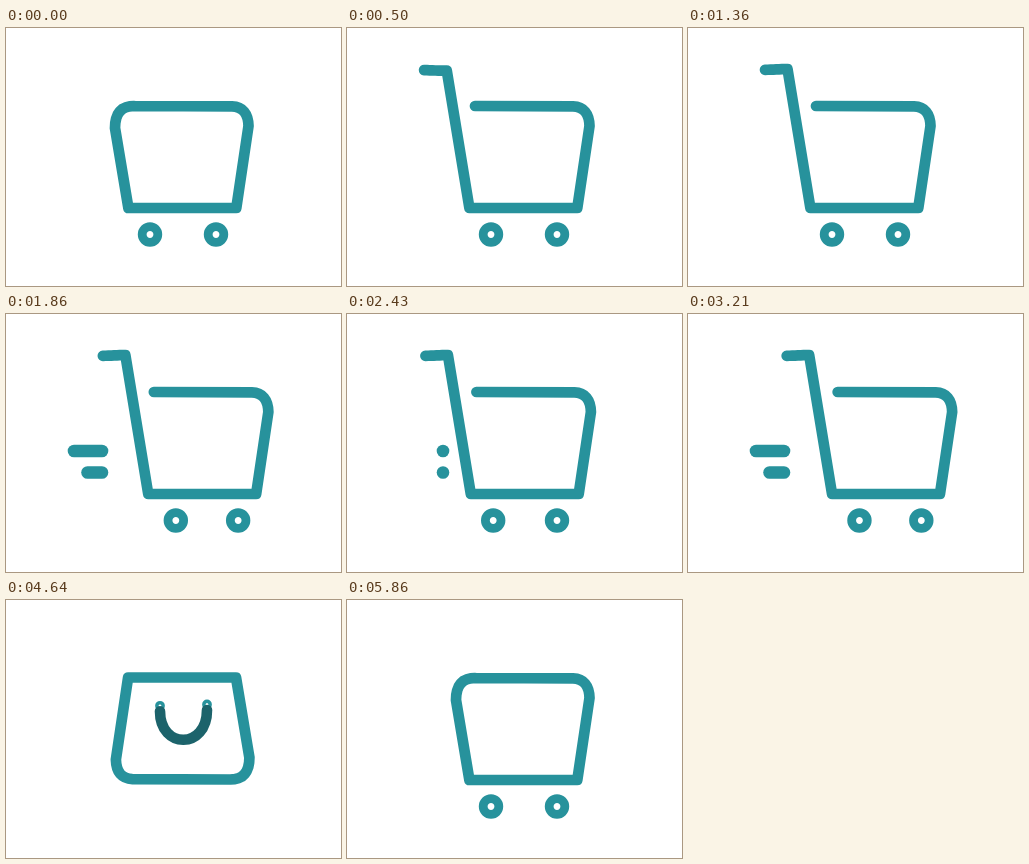
These frames come from a looping animation (335x258 px, 5930 ms). An HTML page:

```html
<!DOCTYPE html>
<html lang="en">
<head>
<meta charset="utf-8">
<title>Cart and bag</title>
<style>
  html, body { margin: 0; width: 100%; height: 100%; overflow: hidden; background: #fff; }
  svg { display: block; width: 100vw; height: 100vh; }
  svg * { fill: none; stroke: #27929c; stroke-linejoin: round; stroke-linecap: round; }
  #body { stroke-width: 10.7; }
  .wheel { stroke-width: 8.8; }
  #strap { stroke: #1c636b; stroke-width: 10.6; }
</style>
</head>
<body>
<svg viewBox="0 0 335 258">
  <path class="dash"/>
  <path class="dash"/>
  <path id="body"/>
  <circle class="wheel" r="7.8"/>
  <circle class="wheel" r="7.8"/>
  <path id="strap" pathLength="1"/>
</svg>
<script>
const LOOP = 5930, STEPS = 83;
const body = document.getElementById('body');
const strap = document.getElementById('strap');
const wheels = document.querySelectorAll('.wheel');
const dashes = document.querySelectorAll('.dash');

const mix = (a, b, k) => a + (b - a) * k;
const clamp = k => Math.min(1, Math.max(0, k));
const ease = k => (1 - Math.cos(Math.PI * k)) / 2;
const span = (t, from, to) => ease(clamp((t - from) / (to - from)));
const pulse = (t, from, to) => Math.sin(Math.PI * clamp((t - from) / (to - from))) ** 2;
const show = (el, on) => { el.style.display = on ? '' : 'none'; };

// Rim and front of the basket, then a lid that swings up around the rear corner
function bodyPath(open) {
  const x = mix(109, 99.5, open), y = mix(100, 41, open);
  let d = `M128 78 L226 78.4 Q242 79 242.5 98 L230.3 180 L122.4 180 L${x} ${y}`;
  for (let s = 0.125; s <= 1; s += 0.125) {
    const dx = 19 * s * s, dy = -22 * s * (2 - s);
    const radius = mix(Math.hypot(dx, dy), 22.5 * s, open);
    const angle = mix(Math.atan2(dy, dx), -3.18, open);
    d += ` L${x + radius * Math.cos(angle)} ${y + radius * Math.sin(angle)}`;
  }
  return d;
}

// Damped bob of a strap ring around its resting height
function ringY(t, delay) {
  const u = Math.max(0, t - 4290 - delay), left = clamp(1 - (t - 4290) / 1000);
  return 107 - 6.5 * Math.exp(-u / 700) * left * Math.sin(2 * Math.PI * u / 1400);
}

// Each wheel follows the cart, then arcs out sideways to become a strap ring
const rear = {
  x: 144, ring: 154, side: -1, bob: 280,
  hop: t => pulse(t, 560, 900),
  follow: drive => 31 * (1 - (1 - drive) ** 1.4)
};
const front = {
  x: 210, ring: 201, side: 1, bob: 0,
  hop: t => pulse(t, 640, 1030),
  follow: drive => 24 * ease(ease(drive))
};

function drawWheel(el, wheel, t, drive) {
  const k = span(t, 3640, 4280) - span(t, 5360, 5850);
  const swing = k * (1 - k) * (t < 4800 ? 400 : 450);
  const x = mix(wheel.x + wheel.follow(drive), wheel.ring, k) + wheel.side * swing;
  const y = mix(206.5 - 16 * wheel.hop(t), ringY(t, wheel.bob), k);
  el.setAttribute('transform', `translate(${x} ${y}) scale(${mix(1, 0.4, k ** 3)})`);
}

function drawDash(el, y, length, size) {
  show(el, size > 0.01);
  el.setAttribute('d', `M${96 - length} ${y}H96.01`);
  el.style.strokeWidth = 12.6 * size;
}

function drawStrap(t) {
  const grown = span(t, 4000, 4285) - span(t, 5360, 5500);
  const [left, right] = [rear, front].map(w => ringY(t, w.bob) + 5.5);
  show(strap, grown > 0.01);
  strap.setAttribute('d', `M154 ${left}C154 149.5 201 149.5 201 ${right}`);
  strap.style.strokeDasharray = `${grown} 1`;
  strap.style.strokeDashoffset = (grown - 1) / 2;
}

function draw(t) {
  const drive = span(t, 1360, 2130) - span(t, 2130, 2480)
              + span(t, 2480, 3090) - span(t, 3090, 3500);
  const open = span(t, 0, 560) - span(t, 3640, 3900);
  const hop = 4 * pulse(t, 860, 1040) - 24 * pulse(t, 500, 860);
  const turn = 180 * (span(t, 3850, 4290) + span(t, 5360, 5850));
  body.setAttribute('d', bodyPath(open));
  body.setAttribute('transform',
    `translate(${27.5 * drive} ${hop}) rotate(${turn} 176.2 128.75)`);

  drawWheel(wheels[0], rear, t, drive);
  drawWheel(wheels[1], front, t, drive);

  const stretch = clamp((drive - 0.1) / 0.6);
  const size = span(t, 1430, 1600) - span(t, 3400, 3500);
  drawDash(dashes[0], 137, 28 * stretch, size);
  drawDash(dashes[1], 158.5, 14.5 * stretch, size);

  drawStrap(t);
}

const start = performance.now();
function tick() {
  const t = (performance.now() - start) % LOOP;
  const step = Math.floor((t + 5) / LOOP * STEPS) % STEPS;
  draw(step * LOOP / STEPS);
  requestAnimationFrame(tick);
}
tick();
</script>
</body>
</html>
```
